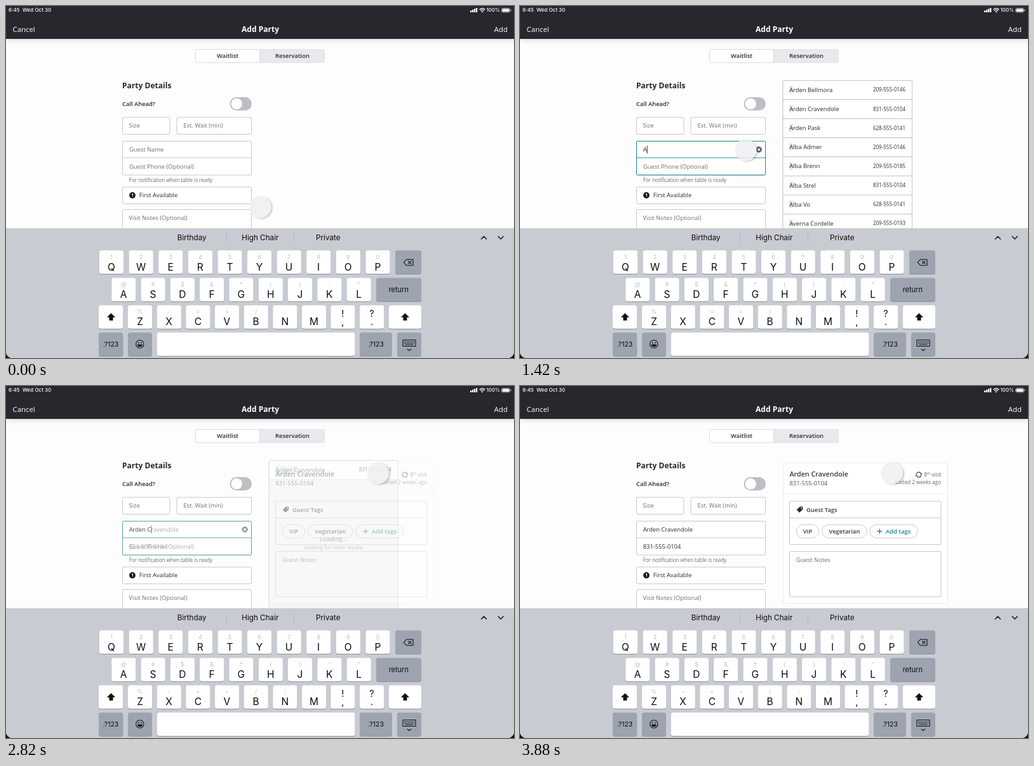
Write an HTML page that moves like this. It is 800 px wide and 556 px high and loops after 3.97 s.

```html
<!DOCTYPE html>
<html lang="en">
<head>
<meta charset="utf-8">
<title>Add Party</title>
<style>
  html, body { margin: 0; width: 100%; height: 100%; overflow: hidden; background: #fdfdfe; }
  svg { display: block; width: 800px; height: 556px; }
  text { font-family: "Open Sans", "Noto Sans", sans-serif; white-space: pre; }
  .key { font-family: Inter, Roboto, sans-serif; }
</style>
</head>
<body>
<svg id="stage" viewBox="0 0 800 556"></svg>
<script>
const INK = '#2b282d', GREY = '#6e6e73', LINE = '#c8c8cc', TEAL = '#148a92';
const BODY = 9.38, SMALL = 8.04;
const LOOP = 3970;

// Text is placed by the vertical centre of its capitals.
const text = (x, y, str, { size = BODY, fill = INK, weight = 400, anchor = 'start', cls = '', id = '' } = {}) =>
  `<text x="${x}" y="${y + size * 0.36}" font-size="${size}" fill="${fill}" font-weight="${weight}" text-anchor="${anchor}" class="${cls}" id="${id}">${str}</text>`;
const box = (x, y, w, h, { fill = '#fff', stroke = LINE, r = 2 } = {}) =>
  `<rect x="${x}" y="${y}" width="${w}" height="${h}" rx="${r}" fill="${fill}" stroke="${stroke}"/>`;
const line = (x1, y1, x2, y2, stroke = LINE, width = 1) =>
  `<path d="M${x1} ${y1}L${x2} ${y2}" stroke="${stroke}" stroke-width="${width}"/>`;
const stroked = (d, stroke = '#111', width = 1.2) =>
  `<path d="${d}" fill="none" stroke="${stroke}" stroke-width="${width}" stroke-linecap="round" stroke-linejoin="round"/>`;
const shape = (d, fill = '#111') => `<path d="${d}" fill="${fill}"/>`;
const circle = (x, y, r, fill) => `<circle cx="${x}" cy="${y}" r="${r}" fill="${fill}"/>`;

const guests = [
  ['Arden Bellmora', '209-555-0146'],
  ['Arden Cravendole', '831-555-0104'],
  ['Arden Pask', '628-555-0141'],
  ['Alba Admer', '209-555-0146'],
  ['Alba Brenn', '209-555-0185'],
  ['Alba Strel', '831-555-0104'],
  ['Alba Vo', '628-555-0141'],
  ['Averna Cordelle', '209-555-0193'],
];
const [guestName, guestPhone] = guests[1];

function header() {
  const white = { fill: '#fff' }, status = { ...white, size: 8, cls: 'key', weight: 500 };
  const bars = [3, 4.3, 5.7, 7].map((h, i) =>
    `<rect x="${731 + i * 3}" y="${10 - h}" width="2.2" height="${h}" rx=".5" fill="#fff"/>`).join('');
  return `<rect y="-20" width="800" height="72" fill="${INK}" filter="url(#headerShadow)"/>`
    + text(4, 6.5, '6:45', status) + text(26, 6.5, 'Wed Oct 30', status) + bars
    + stroked('M745.8 5.4Q750 1.8 754.2 5.4M747.4 7.2Q750 5 752.6 7.2', '#fff', 1.3) + circle(750, 9.2, 1.1, '#fff')
    + text(778, 6.5, '100%', { ...status, anchor: 'end' })
    + box(780.5, 3.5, 13, 6.5, { fill: 'none', stroke: '#aaa' })
    + `<rect x="781.5" y="4.5" width="11" height="4.5" rx="1" fill="#fff"/><rect x="794.6" y="5.4" width="1.2" height="2.6" fill="#aaa"/>`
    + text(10.5, 37, 'Cancel', { ...white, size: 11.4 })
    + text(790, 37, 'Add', { ...white, size: 11.4, anchor: 'end' })
    + text(400.5, 36.5, 'Add Party', { ...white, size: 12.06, weight: 700, anchor: 'middle' });
}

function form() {
  const bold = { weight: 600 }, tab = { weight: 600, anchor: 'middle' }, hint = { fill: GREY };
  return box(298.5, 68.5, 203, 21, { fill: '#e9e8ec', stroke: '#e3e2e6', r: 3 })
    + box(298.5, 68.5, 101, 21, { stroke: '#dcdce0', r: 3 })
    + text(349, 79, 'Waitlist', tab) + text(451, 79, 'Reservation', tab)
    + text(183, 126, 'Party Details', { size: 12.06, weight: 700 })
    + text(183, 154.7, 'Call Ahead?', bold)
    + `<rect x="352.5" y="144" width="34.5" height="21" rx="10.5" fill="#bfbec4"/>` + circle(363.2, 154.5, 8.7, '#fff')
    + box(183.5, 176, 74.5, 26.5) + text(193.5, 189, 'Size', hint)
    + box(269, 176, 117.5, 26.5) + text(279.5, 189, 'Est. Wait (min)', hint)
    + box(183.5, 213.5, 203, 53.5) + line(184, 239.8, 386, 239.8)
    + text(194, 226.7, 'Guest Name', { ...hint, id: 'namePlaceholder' })
    + text(194, 253.7, 'Guest Phone (Optional)', { ...hint, id: 'phonePlaceholder' })
    + text(193.8, 274.8, 'For notification when table is ready', { ...hint, size: SMALL })
    + box(183.5, 286, 203, 26.5) + circle(199, 299, 4.9, '#1d1a20')
    + text(199, 299, '1', { size: 6.5, weight: 700, fill: '#fff', anchor: 'middle' })
    + text(209.8, 299, 'First Available')
    + box(183.5, 321.5, 203, 60) + text(193.5, 335, 'Visit Notes (Optional)', hint);
}

function searchLayer() {
  return `<g id="focus">${box(183.5, 213.5, 203, 53.5, { fill: 'none', stroke: TEAL })}${line(184, 239.8, 386, 239.8, '#36b3ba')}
      <path id="caret" d="M0 220.5v12.5" stroke="#222"/></g>`
    + text(193.7, 226.7, '', { id: 'typed' })
    + `<g id="clear">${circle(376.2, 226.7, 4.7, '#56535a')}${stroked('M374.4 224.9l3.6 3.6m0-3.6l-3.6 3.6', '#fff')}</g>
      <g id="list"></g>`;
}

function guestCard() {
  const bold = { weight: 600, fill: '#3a373d' }, right = { size: SMALL, fill: '#6a676d', anchor: 'end' };
  const pill = (x, w) => box(x, 219, w, 21, { r: 10.5 });
  return text(193.7, 227, guestName) + text(193.7, 253.7, guestPhone)
    + box(414.5, 121.5, 259, 222, { stroke: '#ececef' }) + line(415, 170.5, 673, 170.5, '#ececef')
    + text(424.5, 139.5, guestName, { ...bold, size: 10.72 })
    + text(424.5, 153.3, guestPhone, { fill: '#555259' })
    + stroked('M624.2 138.8A3.9 3.9 0 0 1 631.3 138M631.8 141.2A3.9 3.9 0 0 1 624.7 142', '#444')
    + shape('M632.9 137.2v2.8h-3zM623.1 142.8v-2.8h3z', '#444')
    + text(663, 140, '8<tspan font-size="5.3" dy="-3">th</tspan><tspan dy="3"> visit</tspan>', right)
    + text(663, 152.6, 'Visited 2 weeks ago', right)
    + box(424.5, 182, 238.5, 68.5) + line(425, 208.3, 663, 208.3)
    + shape('M441 190.5h4.3v4.4l-5.2 5-4.5-4.3z', INK) + circle(443.3, 192.5, 0.9, '#fff')
    + text(451, 195.3, 'Guest Tags', bold)
    + pill(435.2, 35.5) + text(453, 229.5, 'VIP', { ...bold, anchor: 'middle' })
    + pill(475.7, 70.5) + text(511, 229.5, 'Vegetarian', { ...bold, anchor: 'middle' })
    + pill(551, 75.3) + stroked('M562.8 229.5h7m-3.5-3.5v7', TEAL, 1.3)
    + text(576, 229.5, 'Add tags', { weight: 600, fill: TEAL })
    + box(424.5, 261.3, 238.5, 71.7) + text(435, 274.3, 'Guest Notes', { fill: GREY });
}

function keyboard() {
  const mid = { cls: 'key', anchor: 'middle', fill: '#0c0c0e' };
  const label = (x, y, str, size, fill = mid.fill) => text(x, y, str, { ...mid, size, fill });
  const key = (x, y, w, dark) =>
    `<rect x="${x}" y="${y + 1}" width="${w}" height="37" rx="3.5" fill="#8b8f98"/>
     <rect x="${x}" y="${y}" width="${w}" height="37" rx="3.5" fill="${dark ? '#9da4b0' : '#fff'}"/>`;
  const letters = (chars, hints, x0, pitch, y) => [...chars].map((c, i) => {
    const x = x0 + i * pitch;
    return key(x - 19, y, 38.2) + label(x, y + 10.3, hints[i], 9, '#bfc0c5') + label(x, y + 26, c, 15.5);
  }).join('');
  const punctuation = (x, upper, lower) => key(x - 19, 472.7, 38.2) + label(x, 485.5, upper, 14.5) + label(x, 498.3, lower, 14.5);
  const shift = x => shape(`M${x} 485.3l6.6 6.4h-3.6v5h-6v-5h-3.6z`);
  const row4 = 515.7;
  return `<rect y="351" width="800" height="205" fill="#c8cbd2"/>`
    + label(292.7, 366, 'Birthday', 11.7) + label(400.3, 366, 'High Chair', 11.7) + label(507.3, 366, 'Private', 11.7)
    + line(347, 357, 347, 376, '#b7bac2') + line(453.5, 357, 453.5, 376, '#b7bac2')
    + stroked('M748.5 368l4-4 4 4M775.2 364l4 4 4-4', '#111', 1.5)
    + letters('QWERTYUIOP', '1234567890', 166, 46.6, 386)
    + letters('ASDFGHJKL', '@#$&*()\'"', 185.2, 46.3, 429.6)
    + letters('ZXCVBNM', '%-+=/;:', 211, 45.65, 472.7)
    + punctuation(530.3, '!', ',') + punctuation(576, '?', '.')
    + key(613, 386, 41, true) + stroked('M626.3 405l4.4-4.8h10.3v9.6h-10.3zM633.6 402.8l4.4 4.4m0-4.4l-4.4 4.4', '#111', 1.1)
    + key(583, 429.6, 71, true) + label(618.3, 448, 'return', 11)
    + key(146, 472.7, 38.2) + shift(165.5) + key(603, 472.7, 51) + shift(628.5)
    + key(146, row4, 38.2, true) + label(165, 534, '.?123', 10.5)
    + key(192, row4, 38, true) + stroked('M204.6 534a6.2 6.2 0 1 0 12.4 0a6.2 6.2 0 1 0-12.4 0', '#111', 1.1)
    + circle(208.7, 532, 0.9, '#111') + circle(212.9, 532, 0.9, '#111') + shape('M206.8 534.6h8a4 3.6 0 0 1-8 0z')
    + key(238, row4, 311.5)
    + key(557, row4, 51, true) + label(582.7, 534, '.?123', 10.5)
    + key(616, row4, 38, true) + stroked('M625 527.5h20v10h-20zM628.7 535h12.5M632 542l3 2.3 3-2.3', '#111', 1.1)
    + `<path d="M627 530.3h16M627 532.7h16" stroke="#111" stroke-width="1.2" stroke-dasharray="1.5 1"/>`
    + shape('M0 548v8h8Q1.5 554.5 0 548zM800 548v8h-8Q798.500 554.5 800 548z', '#111');
}

stage.innerHTML = `<defs>
    <filter id="headerShadow" x="-5%" width="110%" y="-30%" height="170%"><feDropShadow dy="2" stdDeviation="4" flood-opacity=".14"/></filter>
    <filter id="cursorShadow" x="-30%" width="160%" y="-30%" height="160%"><feDropShadow dy="1.2" stdDeviation="1.4" flood-opacity=".28"/></filter>
  </defs><rect width="800" height="556" fill="#fdfdfe"/>`
  + form() + `<g id="search">${searchLayer()}</g><g id="result">${guestCard()}</g>` + header() + keyboard()
  + `<g id="cursor" opacity=".86"><circle r="17" fill="#f0eff2" filter="url(#cursorShadow)"/></g>`;

const $ = id => document.getElementById(id);
const clamp = v => Math.min(1, Math.max(0, v));
const progress = (t, from, to) => clamp((t - from) / (to - from));

// cubic-bezier(.25, .1, .25, 1)
function ease(x) {
  if (x <= 0 || x >= 1) return clamp(x);
  let lo = 0, hi = 1, u;
  for (let i = 0; i < 22; i++) {
    u = (lo + hi) / 2;
    if (0.75 * u * (1 - u) + u ** 3 < x) lo = u; else hi = u;
  }
  return 0.3 * u * (1 - u) ** 2 + 3 * u * u * (1 - u) + u ** 3;
}

function queryAt(t) {
  if (t < 1420) return '';
  if (t >= 1940) return guestName.slice(0, 7);
  return guestName.slice(0, Math.min(5, 1 + Math.floor((t - 1420) / 105)));
}

let shown = null;
function showList(query, marked) {
  const state = query + '|' + marked;
  if (state === shown) return;
  shown = state;
  $('typed').textContent = query;
  $('caret').setAttribute('transform', `translate(${194.3 + (query ? $('typed').getComputedTextLength() : 0)})`);
  const pitch = 30.15;
  const matches = query ? guests.filter(([name]) => name.startsWith(query)) : [];
  $('list').innerHTML = !query ? '' : box(414, 117.7, 203.5, 250, { fill: '#efeff0' })
    + (matches.length < 4
      ? text(515.5, 241.3, 'Loading...', { weight: 600, fill: GREY, anchor: 'middle' })
        + text(515.5, 255.3, 'Looking for more results', { size: SMALL, fill: GREY, anchor: 'middle' }) : '')
    + matches.map(([name, phone], i) => {
      const y = 132.5 + i * pitch;
      return box(414, y - 14.8, 203.5, pitch)
        + `<rect class="mark" x="424" y="${y - 6.5}" height="12.5" fill="#dfeef2"/>`
        + text(424.2, y, name) + text(607, y, phone, { size: SMALL, anchor: 'end' });
    }).join('');
  $('list').querySelectorAll('.mark').forEach(mark =>
    mark.setAttribute('width', mark.nextElementSibling.getSubStringLength(0, marked)));
}

function draw(t) {
  const query = queryAt(t);
  showList(query, t >= 1940 && t < 1970 ? 5 : query.length);

  const fade = ease(progress(t, 2700, 3200));
  $('search').setAttribute('opacity', 1 - fade);
  $('result').setAttribute('opacity', fade);
  $('phonePlaceholder').setAttribute('opacity', 1 - fade);
  $('namePlaceholder').setAttribute('opacity', query ? 0 : 1);
  $('clear').setAttribute('opacity', query ? 1 : 0);
  $('focus').setAttribute('opacity', progress(t, 760, 880));

  // A straight move to the field, then an arc up to the first row.
  const toField = ease(progress(t, 30, 530)), toRow = ease(progress(t, 1650, 2420));
  const x = 400.5 - 45 * toField + 230.5 * (1 - (1 - toRow) ** 2);
  const y = 317.5 - 90 * toField - 90 * toRow ** 2;
  $('cursor').setAttribute('transform', `translate(${x} ${y})`);
}

const start = performance.now();
function tick() {
  draw((performance.now() - start) % LOOP);
  requestAnimationFrame(tick);
}
tick();
</script>
</body>
</html>
```
